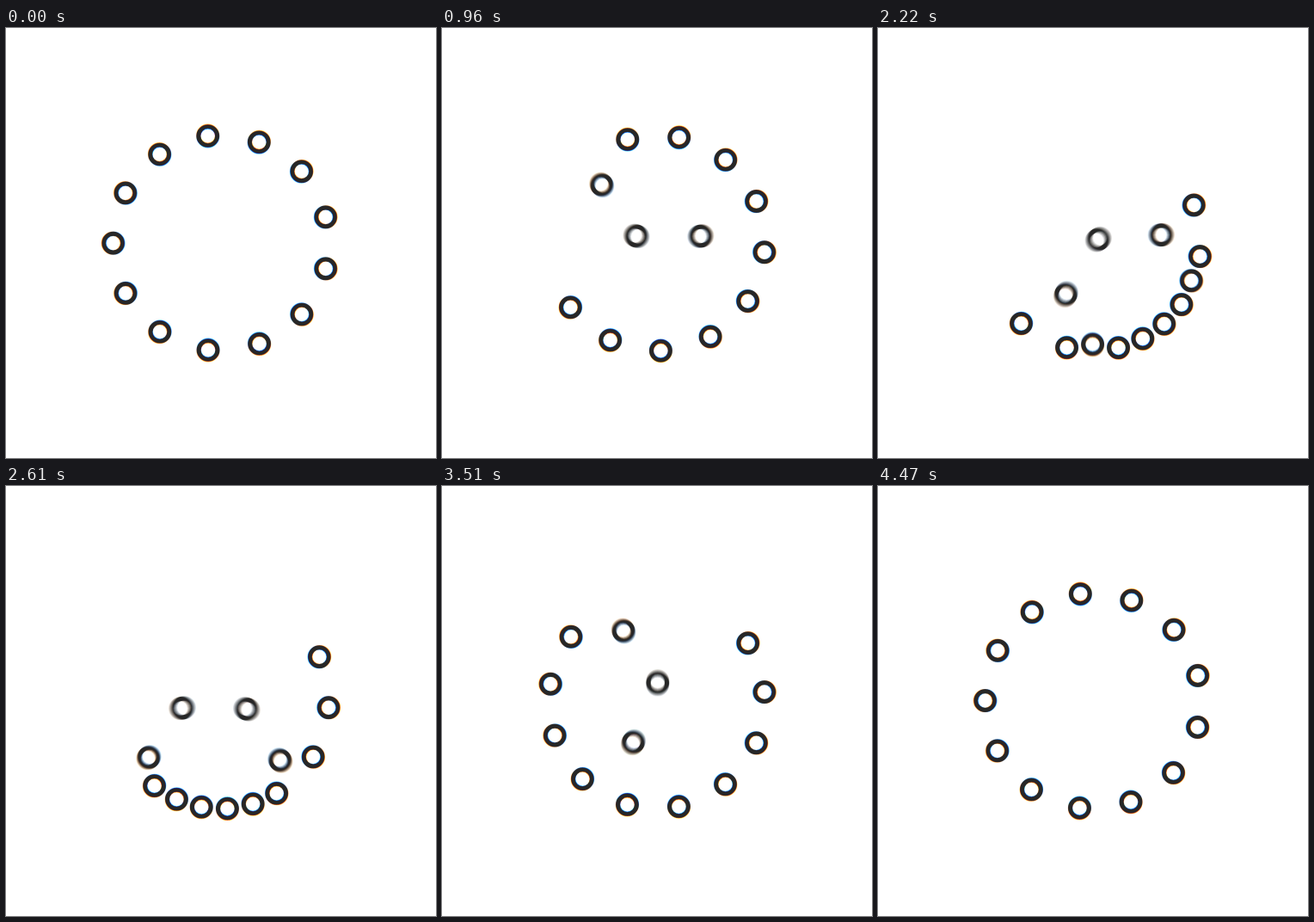
Write an HTML page with a canvas that moves like this. It is 500 by 500 pixels and loops after 4.5 s.

```html
<!DOCTYPE html>
<html lang="en">
<head>
<meta charset="utf-8">
<title>Rings crossing a circle</title>
<style>
  html, body { margin: 0; height: 100%; overflow: hidden; background: #fff; }
  canvas { display: block; }
</style>
</head>
<body>
<canvas id="stage" width="500" height="500"></canvas>
<script>
const ctx = document.getElementById('stage').getContext('2d');
const LOOP = 4500, STEP = 30, SHUTTER = 18, SAMPLES = 8;
const COUNT = 13, RADIUS = 125.4, SLOT = 2 * Math.PI / COUNT;
// Each colour channel is scaled slightly differently, for a faint fringe.
const CHANNELS = [['#1b0000', 0.9965], ['#001b00', 1], ['#00001b', 1.0035]];

const smooth = x => {
  x = Math.min(1, Math.max(0, x));
  return x * x * (3 - 2 * x);
};

function drawRings(u) {
  const turn = Math.PI - 1.5 * SLOT * u;
  const wave = 3.5 * (u + (smooth(u) - u) / 3);
  for (let i = 0; i < COUNT; i++) {
    const angle = turn + i * SLOT;
    const r = RADIUS * (1 - 2 * smooth(wave - 2.5 * i / (COUNT - 1)));
    for (const [color, scale] of CHANNELS) {
      ctx.strokeStyle = color;
      ctx.beginPath();
      ctx.arc(250 + scale * r * Math.cos(angle), 250 + scale * r * Math.sin(angle), 10.9, 0, 2 * Math.PI);
      ctx.stroke();
    }
  }
}

function draw(now) {
  const t = Math.floor((now + 1) / STEP) * STEP % LOOP;
  ctx.globalCompositeOperation = 'source-over';
  ctx.fillStyle = '#fff';
  ctx.fillRect(0, 0, 500, 500);
  // Subtract each sample from white to build up motion blur.
  ctx.globalCompositeOperation = 'difference';
  ctx.lineWidth = 5.2;
  for (let s = 0; s < SAMPLES; s++) drawRings((t + SHUTTER * s / SAMPLES) / LOOP);
}

function tick() {
  draw(performance.now());
  requestAnimationFrame(tick);
}
tick();
</script>
</body>
</html>
```
